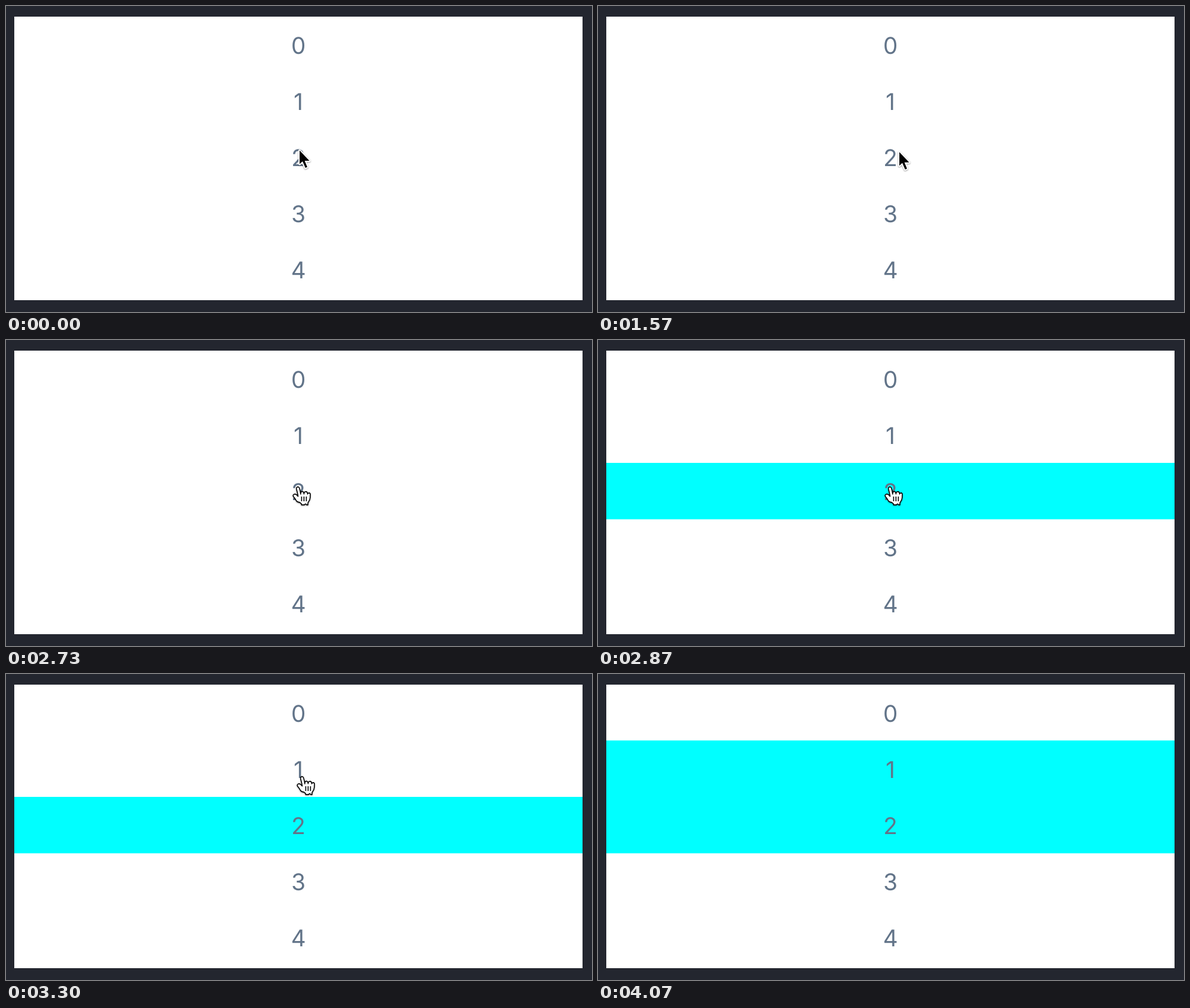
These frames come from a looping animation (990x518 px, 4.43 s). An HTML page:

```html
<!DOCTYPE html>
<html lang="en">
<head>
<meta charset="utf-8">
<title>Clickable rows</title>
<style>
  html, body { margin: 0; width: 100%; height: 100%; overflow: hidden; background: #23262f; }
  svg { display: block; }
  text { font: 39px Inter, sans-serif; fill: #627489; text-anchor: middle; text-rendering: geometricPrecision; }
  #arrow, #hand { filter: drop-shadow(0 1.5px 1.2px rgba(0, 0, 0, .4)); }
  #arrow { stroke: #fff; stroke-width: 4; stroke-linejoin: round; paint-order: stroke; }
  #hand { fill: #fff; stroke: #000; stroke-width: .8; stroke-linejoin: round; }
</style>
</head>
<body>
<svg width="990" height="518" viewBox="0 0 990 518">
  <rect x="14" y="18" width="960" height="480" fill="#fff"/>
  <g id="rows"></g>
  <path id="arrow" d="M0 0V23L5 18.4L9.8 29.4L13 28L8.6 17.6H16.6Z"/>
  <g id="hand">
    <g transform="scale(2)">
      <path d="M-1.1 12Q-2 10.2-3.8 8.1C-4.4 6.8-3 5.4-1.1 6.7L.2 8.1Q0 6-1.1 2.1C-1.5-.2.9-.8 1.4 1.4
        Q2 3.2 2.4 6.2C2.2 3.4 5 3 5.2 6.1C5.3 3.6 8 3.2 8.3 6.2C8.6 4.8 10.5 4.8 10.5 6.4
        Q10.6 9.4 10 11.1L8.5 13.7V15.3H7.6L6.7 14.5H6.3L5.5 15.3H3.2L3 14.3L1.6 13.2Q-.5 13-1.1 12Z"/>
      <path d="M3.2 8.3V12.3M5.2 8.3V12.3M7.2 8.3V12.3"/>
    </g>
  </g>
</svg>
<script>
const LOOP = 4430, FPS = 30;
const TOP = 17, PITCH = 95.5, DIGIT_PITCH = 95;
const HAND_FROM = 68, GONE_FROM = 112; // times are in ticks of 1/30 s
const clickedAt = { 1: 105, 2: 86 };

const home = [496, 244.5];
const moves = [ // from, to, x, y of the pointer tip
  [29.5, 35, 510, 247],
  [46, 49, 506.5, 248],
  [67, 68, 504, 248.5],
  [74, 82, 493, 248.5],
  [86, 99, 500, 173.5],
  [106, 111, 500, 80.5]
];

const $ = id => document.getElementById(id);
const show = (el, on) => el.setAttribute('visibility', on ? 'visible' : 'hidden');

for (let i = 0; i < 5; i++) {
  $('rows').innerHTML +=
    `<rect id="row${i}" x="14" y="${TOP + PITCH * i}" width="960" height="${PITCH}" fill="#0ff"/>
     <text x="494" y="${80.5 + DIGIT_PITCH * i}">${i}</text>`;
}

function ease(tick, from, to) {
  const u = Math.min(1, Math.max(0, (tick - from) / (to - from)));
  return u * u * (3 - 2 * u);
}

function tipAt(tick) {
  return moves.reduce(([x, y], [from, to, toX, toY]) => {
    const e = ease(tick, from, to);
    return [x + (toX - x) * e, y + (toY - y) * e];
  }, home);
}

function draw(now) {
  const tick = Math.floor((now % LOOP + 4) * FPS / 1000);
  const tip = tipAt(tick).join(' ');
  for (const id of ['arrow', 'hand']) $(id).setAttribute('transform', `translate(${tip})`);
  show($('arrow'), tick < HAND_FROM);
  show($('hand'), tick >= HAND_FROM && tick < GONE_FROM);
  for (let i = 0; i < 5; i++) show($('row' + i), tick >= clickedAt[i]);
}

let start;
function loop(now) {
  start ??= now;
  draw(now - start);
  requestAnimationFrame(loop);
}
draw(0);
requestAnimationFrame(loop);
</script>
</body>
</html>
```
